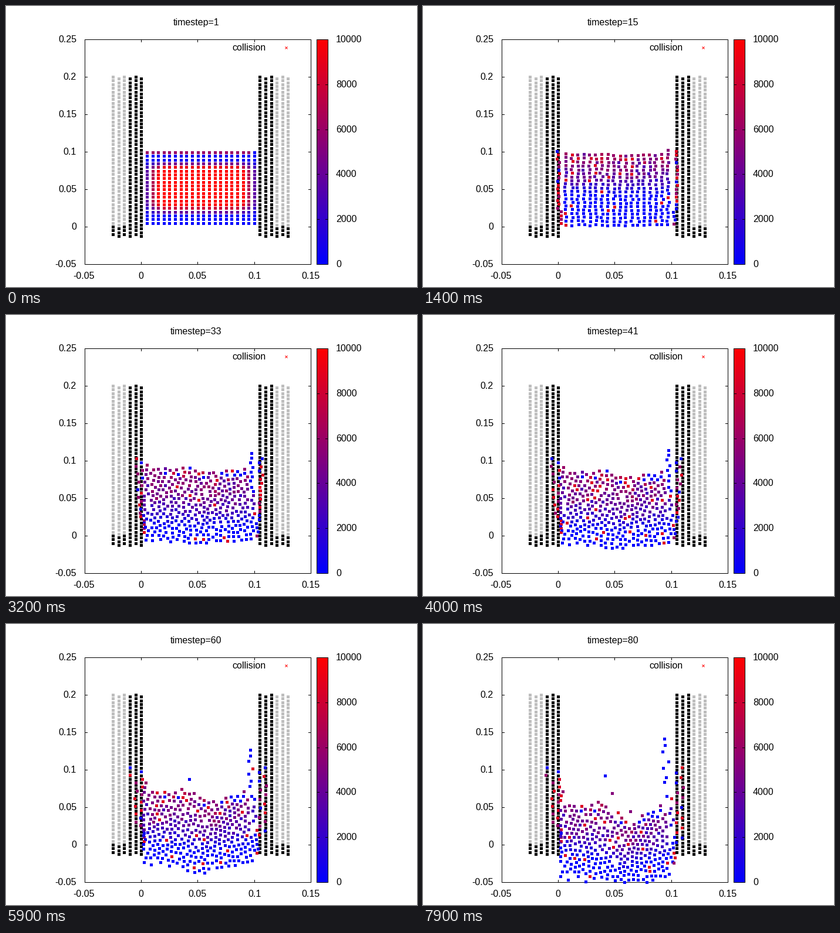
Animation of 700x480 px, one loop 8000 ms. Source, as a matplotlib script:

```python
import numpy as np
import matplotlib.pyplot as plt
from matplotlib.animation import FuncAnimation
from matplotlib.collections import LineCollection, PolyCollection
from matplotlib.colors import LinearSegmentedColormap

W, H, DPI = 700, 480, 100
FRAMES, INTERVAL = 80, 100
N = 20
PT = 72 / DPI

plt.rcParams["font.family"] = "Liberation Sans"
plt.rcParams["font.size"] = 16 * PT

rng = np.random.default_rng(7)
col, row = np.meshgrid(np.arange(N), np.arange(N), indexing="ij")
depth = row / (N - 1)


def px(x):
    return 230.25 + 1925 * x


def py(y):
    return 377 - 1280 * y


def ramp(f, start, length):
    return np.clip((f - start) / length, 0, 1)


def bump(x, center, width):
    return np.exp(-((x - center) / width) ** 2)


# --- motion of the 20 x 20 block of fluid, row 0 on top ---
def flow(f):
    """Mean position of every particle: the block sags and creeps up the sides."""
    t = f / (FRAMES - 1)
    spread = 1 - np.exp(-4 * t)
    left, right = 249.5 - 12.5 * spread, 413.4 + 6.6 * spread
    x = left + (right - left) * (col - 1) / (N - 3)
    sag = (1 - 0.45 * np.exp(-(x - left) / 10) - 1.71 * np.exp((x - right) / 3.5)
           - 0.25 * bump(x, 305, 22) + 0.33 * bump(x, 358, 25))
    top = 250 + 72 * t**1.6 * sag
    low = 370.6 + 58 * t**1.8 * (1 + 0.5 * bump(x, 335, 35))
    lean = 12 * t**2 * (col == N - 2) * (1 - depth) ** 2
    return np.stack([x - lean, top + (low - top) * depth], -1)


def soak(f, side, wobble):
    """Outer column: reaches the wall, then every other particle seeps in."""
    r = np.arange(N)
    start, face = (239.9, 230.5) if side < 0 else (422.75, 431.5)
    reach = np.where(r > 15, 0.5, 1) * ramp(f, 0, 13)
    begin = (10 if side < 0 else 19) + r
    limit = np.where((r < 4) & (side < 0), 2, 1) * ((r % 2 == 0) & (r < 15))
    seep = 9.5 * np.clip((f - begin) / 25, 0, limit)
    x = start + (face - start) * reach + side * seep + wobble * ramp(f, 0, 15)
    rise = 5 * ramp(f, 0, 30)
    sink = 38 * (f / FRAMES) ** 2 * (side > 0)
    return np.stack([x, np.linspace(250 - rise, 370.6 + sink, N)], -1)


def relax(p, gap):
    """Push close particles apart, keeping them between the walls."""
    d = p[:, None] - p[None]
    dist = np.hypot(d[..., 0], d[..., 1]) + 1e-6
    np.fill_diagonal(dist, np.inf)
    push = 0.25 * np.clip(gap - dist, 0, None) / dist
    p = p + (d * push[..., None]).sum(1)
    p[:, 0] = np.clip(p[:, 0], 234, 428)
    return p


# drops that leave the surface: column, launch time, velocity
DROPS = [(8, 45, (-0.1, -0.3)), (9, 55, (0.1, 0)), (12, 68, (0, 0.2))]


def build_path():
    path = np.zeros((FRAMES, N, N, 2))
    drift = rng.normal(0, 0.07, (N - 2, N, 2))
    wobble = rng.normal(0, 0.9, (2, N))
    shift = np.zeros_like(drift)
    for f in range(FRAMES):
        pos = flow(f)
        mean = pos[1:-1].copy()
        if f:
            shift += drift
            gap = 6.2 + 1.8 * ramp(f, 10, 22)
            for _ in range(2):
                moved = relax((mean + shift).reshape(-1, 2), gap)
                shift = moved.reshape(mean.shape) - mean
        pos[1:-1] = mean + shift
        pos[0] = soak(f, -1, wobble[0])
        pos[-1] = soak(f, 1, wobble[1])
        for c, launch, v in DROPS:
            if f > launch:
                pos[c, 0] = path[launch, c, 0] + np.array(v) * (f - launch)
        path[f] = pos
    return path


PATH = build_path()

# --- pressure and collisions ---
edge = np.minimum(col, N - 1 - col)
across = np.minimum(0.3 + 0.28 * edge, 1.1)
down = np.minimum(np.clip(0.42 * (row - 2), 0.04, 1.2),
                  np.clip(0.36 * (17 - row), 0, 1.2))
FIRST = np.where((row == 0) & (col < N - 1), 0.6, np.clip(across * down, 0, 1))

grain = 1 + rng.normal(0, 0.2, (N, N))
pick = rng.random((N, N))
loose = ((row < 2) & (pick < 0.35)) | ((col == N - 2) & (row < 9))
hit_rate = np.where(row < 6, 0.13, 0.06)
hit_rate[0] = 0.45
hit_rate[-1] = 0.35
hit_rate[-2] = 0.06


def pressure(f):
    t = f / (FRAMES - 1)
    reach = 0.6 + 0.28 * ramp(f, 14, 18) - 0.15 * t
    p = (0.56 - 0.08 * t) * grain * np.clip(1 - (depth / reach) ** 2, 0, 1)
    p = np.where(loose & (f > 14), 0.02, p)
    p = np.where(edge == 0, np.where(pick < 0.65, 0.58, 0.05), p)
    return FIRST + (np.clip(p, 0, 1) - FIRST) * ramp(f, 0, 6)


def state(f):
    hit = np.random.default_rng(100 + f).random((N, N)) < hit_rate * ramp(f, 0, 6)
    p = np.where(hit, np.maximum(pressure(f), 0.75), pressure(f))
    xy = np.round(PATH[f]).reshape(-1, 2)
    shown = (xy[:, 1] > 57) & (xy[:, 1] < 442)
    return xy[shown], p.ravel()[shown], hit.ravel()[shown]


# --- drawing on whole pixels ---
SQUARE = np.array([(-2, -2), (3, -2), (3, 3), (-2, 3)])
CROSS = np.array([[(-2, -2), (2, 2)], [(-2, 2), (2, -2)]]) + 0.5

fig = plt.figure(figsize=(W / DPI, H / DPI), dpi=DPI, facecolor="white")
ax = fig.add_axes([0, 0, 1, 1])
ax.axis("off")
cmap = LinearSegmentedColormap.from_list("heat", ["#0000ff", "#ff0000"], 256)
ax.imshow(np.linspace(1, 0, 256)[:, None], cmap=cmap, aspect="auto",
          extent=(529, 549, 442, 57), zorder=1)
ax.set_xlim(0, W)
ax.set_ylim(H, 0)


def square_paths(xy):
    return np.asarray(xy)[:, None] + SQUARE


def cross_paths(xy):
    return (np.asarray(xy)[:, None, None] + CROSS).reshape(-1, 2, 2)


def squares(xy, color, z):
    return ax.add_collection(PolyCollection(
        square_paths(xy), facecolors=color, linewidths=0, snap=False, zorder=z))


def crosses(xy):
    return ax.add_collection(LineCollection(
        cross_paths(xy), colors="red", linewidths=PT, snap=False, zorder=5))


def line(xs, ys):
    ax.plot(np.array(xs) + 0.5, np.array(ys) + 0.5, color="black", lw=PT,
            snap=False, solid_capstyle="projecting", solid_joinstyle="miter",
            zorder=2)


def box(x0, y0, x1, y1):
    line([x0, x1, x1, x0, x0], [y0, y0, y1, y1, y0])


def label(x, y, text, ha):
    return ax.text(x, y, text, ha=ha, va="baseline", color="black")


box(134, 57, 519, 441)
box(529, 57, 548, 441)
for i in range(-1, 4):
    gx = round(px(0.05 * i))
    line([gx, gx], [441, 437])
    line([gx, gx], [57, 61])
    label(gx - (i < 0) * 2 + 0.3, 465.5, f"{0.05 * i:.2g}", "center")
for i in range(-1, 6):
    gy = 377 - 64 * i
    line([134, 138], [gy, gy])
    line([519, 515], [gy, gy])
    label(120, gy + 5, f"{0.05 * i:.2g}", "right")
for v in range(0, 10001, 2000):
    gy = round(441 - 384 * v / 10000)
    line([529, 533], [gy, gy])
    line([548, 544], [gy, gy])
    label(562, gy + 5, str(v), "left")
title = label(324, 33, "", "center")
label(443, 76, "collision", "right")
crosses([(477, 71)])

# container walls, every other column half a step lower
black, gray = [], []
for i in range(6):
    for x, outer in ((-0.025 + 0.005 * i, i < 3), (0.105 + 0.005 * i, i > 2)):
        for y in 0.2 - 0.0025 * (i % 2) - 0.005 * np.arange(43):
            spot = np.round([px(x), py(y)])
            (gray if outer and y > 0.001 else black).append(spot)
squares(gray, "#bebebe", 3)
squares(black, "black", 3)

fluid = squares([(0, 0)], "blue", 4)
hits = crosses([(0, 0)])


def draw(f):
    xy, p, hit = state(f)
    fluid.set_verts(square_paths(xy))
    fluid.set_facecolor(cmap(p))
    hits.set_segments(cross_paths(xy[hit]))
    title.set_text(f"timestep={f + 1}")
    return fluid, hits, title


anim = FuncAnimation(fig, draw, frames=FRAMES, interval=INTERVAL,
                     repeat=True, repeat_delay=0, blit=False)
plt.show()
```
